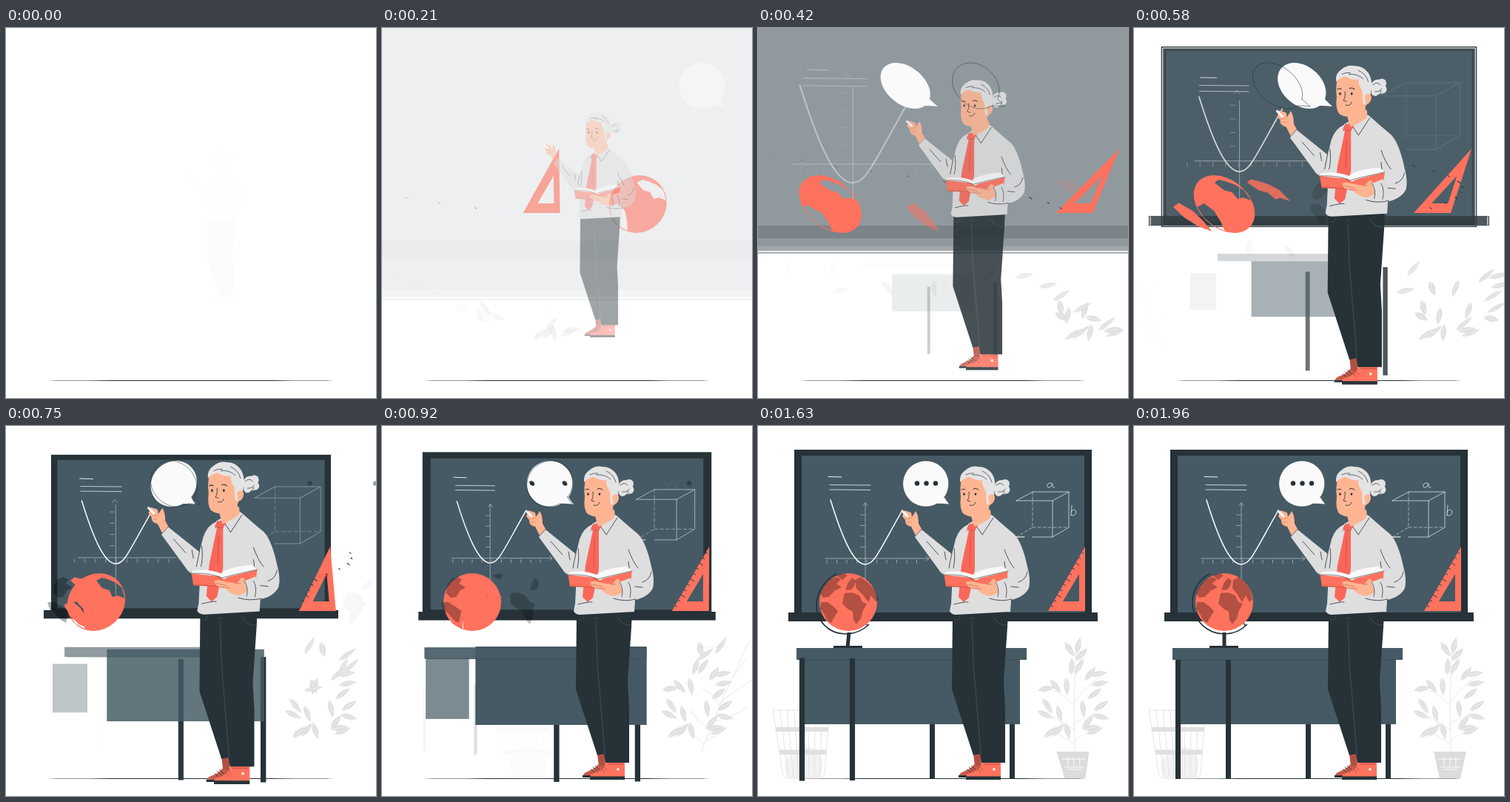
Write an HTML page with a canvas that moves like this. It is 500x500 px and loops after 2000 ms.

```html
<!DOCTYPE html>
<html lang="en">
<head>
<meta charset="utf-8">
<title>Teacher at the board</title>
<style>
html, body { margin: 0; width: 100%; height: 100%; overflow: hidden; background: #fff; }
canvas { display: block; width: 500px; height: 500px; }
</style>
</head>
<body>
<canvas id="stage"></canvas>
<script>
const INK = '#263238', SLATE = '#455a64', RED = '#ff725e', SKIN = '#ffb592',
      SHIRT = '#dedede', HAIR = '#e4e4e4', PALE = '#e0e0e0', CHALK = '#f2f2f2';
const LOOP = 2000, STEP = 1000 / 24;
const dpr = window.devicePixelRatio || 1;
const stage = document.getElementById('stage');
const pool = [];
let depth = 0, now = 0;

function sized(cv) {
  cv.width = cv.height = 500 * dpr;
  return cv.getContext('2d');
}
const main = sized(stage);
let c = main;

// cubic-bezier(.36, -.01, .5, 1.38)
function ease(x) {
  if (x <= 0) return 0;
  if (x >= 1) return 1;
  let lo = 0, hi = 1, t = .5;
  for (let i = 0; i < 24; i++) {
    t = (lo + hi) / 2;
    const u = 1 - t;
    if (1.08 * t * u * u + 1.5 * t * t * u + t * t * t < x) lo = t; else hi = t;
  }
  const u = 1 - t;
  return -.03 * t * u * u + 4.14 * t * t * u + t * t * t;
}

// Draws a group as one translucent layer
function fade(a, draw) {
  if (a < .003) return;
  if (a >= 1) return draw();
  const under = c;
  const l = pool[depth] || (pool[depth] = sized(document.createElement('canvas')));
  depth++;
  l.setTransform(1, 0, 0, 1, 0, 0);
  l.clearRect(0, 0, l.canvas.width, l.canvas.height);
  l.setTransform(under.getTransform());
  c = l;
  draw();
  c = under;
  depth--;
  c.save();
  c.setTransform(1, 0, 0, 1, 0, 0);
  c.globalAlpha = a;
  c.drawImage(l.canvas, 0, 0);
  c.restore();
}

function zoom(from, shift, cx, cy, draw) {
  const p = ease((now + shift) / 1000), s = from + (1 - from) * p;
  c.save();
  c.translate(cx, cy);
  c.scale(s, s);
  c.translate(-cx, -cy);
  fade(p, draw);
  c.restore();
}
const zoomIn = (...a) => zoom(.5, ...a);
const zoomOut = (...a) => zoom(1.5, ...a);

// dir 1 enters from the right, -1 from the left
function rush(dir, shift, cx, cy, draw, power = 1) {
  const x = (now + shift) / 1000;
  let dx = 0, skew = 0, a = 1;
  if (x < .6) {
    const p = ease(x / .6);
    dx = 500 * (1 - p);
    skew = -.577 + .941 * p;
    a = Math.pow(Math.max(p, 0), power);
  } else if (x < .8) skew = .364 - .451 * ease((x - .6) / .2);
  else if (x < 1) skew = -.087 * (1 - ease((x - .8) / .2));
  c.save();
  c.translate(cx + dx * dir, cy);
  c.transform(1, 0, skew * dir, 1, 0, 0);
  c.translate(-cx, -cy);
  fade(a, draw);
  c.restore();
}

function rect(col, x0, y0, x1, y1) {
  c.fillStyle = col;
  c.fillRect(x0, y0, x1 - x0, y1 - y0);
}
function fill(col, d, rule = 'nonzero') {
  c.fillStyle = col;
  c.fill(new Path2D(d), rule);
}
function line(col, w, d) {
  c.strokeStyle = col;
  c.lineWidth = w;
  c.lineCap = c.lineJoin = 'round';
  c.stroke(new Path2D(d));
}
function oval(col, x, y, rx, ry = rx, rot = 0) {
  c.fillStyle = col;
  c.beginPath();
  c.ellipse(x, y, rx, ry, rot, 0, 7);
  c.fill();
}

function board() {
  const edge = Math.max(0, Math.min(1, (750 - now) / 150));
  zoomOut(52, 250, 147, () => {
    zoomOut(28, 250, 147, () => {
      rect(INK, 49, 32, 451, 262);
      if (edge) {
        c.strokeStyle = `rgba(255,255,255,${edge})`;
        c.lineWidth = 1;
        c.strokeRect(51, 34, 398, 226);
      }
    });
    zoomOut(0, 250, 146, () => rect(SLATE, 59, 40, 441, 252));
    zoomOut(-25, 250, 258, () => {
      rect(INK, 41, 252, 459, 264);
      if (edge) line(`rgba(255,255,255,${edge})`, 1, 'M43 253V263M457 253V263');
    });
    axes();
    zoomOut(-90, 146, 143, () =>
      line('#fff', 1.5, 'M98 100C112 145 128 187 145 187C157 187 162 172 195 114'));
    zoomOut(-130, 104, 68, () => line(CHALK, 1, 'M95 68.5L113 69'));
    zoomOut(-135, 124, 82, () => line(CHALK, .8, 'M97 79.5L152 80M97 86L152 86.5'));
    zoomOut(-415, 384, 119, cube);
    zoomOut(-780, 395, 80, () =>
      line(CHALK, .8, 'M398 78C393 75 390 79 391 82C393 85 397 82 398 78Q397 84 401 83'));
    zoomOut(-790, 427, 115, () =>
      line(CHALK, .8, 'M424 107L423 121M423 116C427 110 432 115 429 119Q426 123 423 120'));
  });
}

function axes() {
  const tone = 'rgba(255,255,255,.65)';
  let d = 'M142 108L145 104L148 108M227 176L231 179L227 182';
  for (let x = 93; x < 222; x += 13.5) d += `M${x} 181V185`;
  for (let y = 120; y < 172; y += 14.5) d += `M139 ${y}H144`;
  zoomOut(-20, 145, 168, () => line(tone, .7, 'M145 104V232'));
  zoomOut(-20, 161, 179, () => line(tone, .7, 'M91 179H231'));
  zoomOut(-200, 161, 179, () => line(tone, .7, d));
}

function cube() {
  line('rgba(255,255,255,.8)', .8,
    'M349 101H398V150H371M360 150H349ZM349 101L371 89H420L398 101M420 89V137L398 150');
  c.setLineDash([4, 3]);
  line('rgba(255,255,255,.7)', .7, 'M371 89V137L349 150M371 137H420');
  c.setLineDash([]);
}

function ruler() {
  rush(-1, 48, 417, 207, () => fill(RED, 'M442 163V250H392ZM434 200L412 237H434Z', 'evenodd'));
  for (let i = 1; i < 12; i++) {
    const x = 392 + i * 4.15, y = 250 - i * 7.2, n = i % 3 ? 2.5 : 4.5;
    rush(-1, 40 - i * 30, x, y, () => line(INK, .9, `M${x} ${y}l${n} ${n * .6}`));
  }
}

function bin() {
  rush(1, -620, 59, 430, () => {
    fill('#f2f2f2', 'M36 462Q34 450 44 446Q52 443 60 434Q70 430 78 441Q88 445 87 464Q85 475 80 476H43Q37 474 36 462Z');
    let d = 'M20 384H97M20 384L33 468Q34 476 41 476H83Q89 475 90 469L97 384';
    for (let i = 1; i < 8; i++) d += `M${20 + i * 9.6} 384L${34 + i * 7} 474`;
    line('#dedede', .8, d);
    fill(PALE, 'M24 407H95L94.5 413H25ZM29 437.500H93L92 444H30Z');
  }, 6);
}

// x, y, angle in degrees
const LEAVES = [
  406, 411, -48, 396, 414, -40, 418, 412, 75, 450, 408, -10, 455, 412, -22, 446, 400, -50,
  388, 390, 25, 391, 378, 55, 407, 389, 75, 439, 382, 82, 463, 393, 12, 464, 378, -35,
  455, 362, -38, 462, 348, -12, 460, 335, -12, 449, 335, -52, 417, 352, 85, 402, 352, 50,
  390, 355, -12, 434, 325, -60, 424, 325, -88, 437, 309, -45, 421, 302, 55, 433, 297, -78
];
function plant() {
  rush(-1, -450, 428, 380, () => {
    line(PALE, .7, 'M428 440L427 370L430 292M428 430Q412 420 402 414M428 425Q440 418 448 409' +
      'M428 410Q405 400 390 384M428 400Q450 395 464 380M427 378Q412 362 394 355M427 372Q445 352 462 339M428 340Q432 328 437 312');
  });
  for (let i = 0; i < LEAVES.length; i += 3) {
    const [x, y, deg] = LEAVES.slice(i, i + 3);
    rush(-1, 60 - i * i * .09, x, y, () => {
      c.save();
      c.translate(x, y);
      c.rotate(deg * Math.PI / 180);
      fill(PALE, 'M-12 0Q-3 -8 12 0Q-1 7 -12 0Z');
      line('#fff', .4, 'M-11 0H7');
      c.restore();
    }, 2);
  }
  rush(-1, -890, 427, 458, () => {
    fill('#dcdcdc', 'M405 440H449L441 476H413Z');
    line('#fff', .9, 'M412 450H443M414 461H440M418 464H437M419 448V460M427 448V460M435 448V460');
  });
}

function desk() {
  const leg = (shift, x) => zoomIn(shift, x + 3.5, 396.5, () => rect(INK, x, 316, x + 7, 477));
  zoomIn(42, 207, 388, () => {
    leg(-10, 340);
    leg(-100, 232);
    zoomIn(-200, 242, 352, () => rect(SLATE, 129, 300, 354, 403));
    zoomIn(-440, 90, 355, () => rect(SLATE, 56, 308, 124, 403));
    zoomIn(-320, 207, 307, () => {
      rect(SLATE, 52, 300, 363, 316);
      rect('#3a4d56', 56, 315.5, 354, 316.5);
    });
    leg(-710, 124);
    leg(-815, 56);
  });
}

// outline, centre, arrival
const AFRICA = 'M117 226L127 225L137 229L141 238L147 240L142 249L139 260L133 268L129 262L128 251L121 247L114 240Z';
const LANDS = [
  ['M84 226L90 214L98 207L106 204L112 207L106 213L113 218L103 223L96 231L88 232Z', 98, 218, -300],
  ['M106 202L116 199L121 202L114 208Z', 113, 203, -555],
  ['M85 238L94 238L102 244L108 250L104 257L99 266L94 263L88 252L84 247Z', 96, 252, -300],
  [AFRICA, 131, 246, -570],
  ['M118 222L121 213L127 205L132 209L130 216L126 221Z', 125, 214, -585],
  ['M133 219L134 208L142 204L150 211L157 221L160 234L156 238L151 229L146 238L140 228Z', 147, 221, -964]
];
const SEAS = [
  ['M84 242L95 237L105 247L109 262L110 274L97 267L88 256Z', 96, 255, -125],
  ['M119 209L126 205L134 207L146 212L155 219L160 233L150 229L143 231L138 222L128 219Z', 140, 218, -225]
];
const OCEAN = 'M83 238A39 39 0 0 1 161 238A39 39 0 0 1 83 238Z' + SEAS.map(s => s[0]).join('');

function globe() {
  rush(1, -885, 122, 241, () => {
    c.strokeStyle = INK;
    c.lineWidth = 1.6;
    c.beginPath();
    c.arc(122, 238, 43, .77, 4.24);
    c.stroke();
    line(INK, 1.6, 'M147 265L150 269');
  });
  rush(1, -885, 122, 289, () => rect(INK, 119.5, 279, 124.5, 298));
  rush(1, -730, 121, 298, () => rect(INK, 102, 297, 141, 300), 4);
  rush(1, 36, 122, 238, () => {
    fill(RED, OCEAN, 'evenodd');
    rush(1, 27, 131, 246, () => fill(RED, AFRICA));
    for (const [d, x, y, shift] of SEAS)
      rush(1, shift, x, y, () => { fill(RED, d); line(RED, 1, d); }, 2);
  });
  for (const [d, x, y, shift] of LANDS)
    rush(1, shift, x, y, () => fill('rgba(0,0,0,.3)', d), 2);
}

function shoes() {
  fill('#b34f42', 'M291 443L301 442L302 460L293 460Z');
  fill('#c95a4a', 'M292 457Q298 462 304 457L304 472H272Q272 469 280 466Q288 463 292 457Z');
  line(INK, .8, 'M285 461L291 466M288 459L294 464M282 464L287 468');
  fill(INK, 'M271 472H304V475H271Z');
  fill(RED, 'M303 454H328V474H281Q281 470 290 468Q300 465 303 454Z');
  line('#a94538', .7, 'M296 463L301 468M299 460L304 465M326 457H306');
  oval('#ffe0da', 319, 464, 2);
  fill(INK, 'M281 473.500H328V478H281Z');
}

function head() {
  fill(SKIN, 'M287 118L311 104L314 124Q303 132 292 136Z');
  oval(HAIR, 329, 83, 10);
  oval(HAIR, 334, 78, 6);
  oval(HAIR, 335, 86, 5.5);
  oval(HAIR, 325, 90, 5);
  line(INK, .7, 'M322 80Q328 75 332 80M325 89Q331 90 334 85M330 93Q333 91 333 88');
  fill(SKIN, 'M276 68Q272 82 274 96Q272 111 277 118Q283 123 291 122Q305 121 313 108L316 84Q307 66 276 68Z');
  fill(HAIR, 'M273 76Q272 65 280 60Q288 53 298 55Q309 55 316 64Q322 73 320 87L317 104Q312 107 309 105L308 88Q303 82 303 73Q294 74 286 69Q280 69 273 76Z');
  fill(SKIN, 'M311 95Q317 89 320 95Q321 103 313 107Z');
  line(INK, .7, 'M290 66Q302 65 309 72M303 61Q313 65 316 76M281 66Q286 63 292 64');
  oval(INK, 278.5, 92, 1.3, 1.8);
  oval(INK, 294, 92, 1.3, 1.8);
  line(INK, 1, 'M275 86Q278 84 280 86M291 85Q294 83 298 86');
  line(INK, .8, 'M285 89Q286 96 283 101L287 102M286 107Q292 109 294 103');
}

function torso() {
  fill(SHIRT, 'M284 133Q272 138 267 153L262 173L221 140L212 150L247 198Q254 204 263 200L261 240L259 250Q261 255 268 255L341 251L342 235Q360 231 366 219Q369 208 364 190Q357 157 346 146Q335 137 317 121L300 126Z');
  fill(SKIN, 'M295 127L314 113L315 122L297 136L291 134Z');
  fill(SHIRT, 'M284 132L296 126L292 136L283 142ZM292 134L316 120L318 123L303 147L295 136Z');
  line(INK, .8, 'M295 135L303 147L318 124M283 141L286 132');
  fill('#f9675a', 'M285 133L292 131L297 135L293 141L293 194L285 232L278 238L271 231L275 188L285 141L282 139Z');
  line('#b7483a', .7, 'M285 141L293 141M287 152L286 190');
  line(INK, .8, 'M262 172L258 192M265 165Q267 180 264 192M228 156L244 174M254 181L252 170M333 167Q339 184 346 192M333 183L336 206M364 197Q362 208 352 211M265 241Q280 237 284 238M313 233Q328 238 343 234M342 217L352 218');
}

function hands() {
  fill(SKIN, 'M195 122L198 114L207 117L208 123L213 115Q217 120 217 132L221 139L213 148L207 136Q198 134 199 127Z');
  line('#d98067', .7, 'M199 126L207 124M201 130L207 129');
  line('#fff', 3, 'M195 115L202 122');
  fill(RED, 'M251 198L290 203L296 206L338 194L336 212L299 219L254 217Z');
  line('#b94b3d', .8, 'M254 216L289 218M291 208L290 217');
  fill('#fafafa', 'M252 198Q272 194 290 201Q302 192 331 190L339 196L299 206Q293 211 289 205L251 201Z');
  line(INK, .6, 'M252 201Q278 200 291 207Q310 202 338 196');
  fill(SKIN, 'M281 211Q288 208 296 212L311 214L317 207Q323 205 322 216L326 225L314 230Q302 228 297 222L284 217Z');
  line('#c86b56', .7, 'M284 214L298 217M289 219L302 220M309 214L316 214');
  fill(SHIRT, 'M321 211L336 205L341 232L324 231Q326 220 321 211Z');
  line(INK, .7, 'M321 211Q327 220 324 231M333 211Q338 219 335 232');
}

function person() {
  zoomIn(145, 281, 266, () => {
    shoes();
    fill(INK, 'M263 252L338 250L337 272L332 345L334 380L334 455H302L300 443L291 445L262 356Z');
    line('#52626a', .6, 'M289 264L291 320L301 443M318 258Q324 270 336 269M266 262Q272 264 273 257M287 260H291');
    torso();
    head();
    hands();
  });
}

const BUBBLE = 'M252 96A31 31 0 1 0 242 105Q250 105 259 106Q254 100 252 96Z';
function bubble() {
  rush(1, 46, 228, 78, () => fill('#fafafa', BUBBLE));
  rush(1, -75, 228, 78, () => line(INK, .5, BUBBLE));
  [[215, -490], [227.5, -532], [240, -645]].forEach(([x, shift]) =>
    rush(1, shift, x, 78, () => oval(INK, x, 77.5, 3.2)));
}

function draw(t) {
  const n = Math.floor((t % LOOP + 5) / STEP);
  now = n < 2 ? -95 : n * STEP;
  c = main;
  c.setTransform(dpr, 0, 0, dpr, 0, 0);
  rect('#fff', 0, 0, 500, 500);
  oval(INK, 250, 476.5, 197, .5);
  board();
  ruler();
  bin();
  plant();
  desk();
  globe();
  person();
  bubble();
}

const start = performance.now();
function tick() {
  draw(performance.now() - start);
  requestAnimationFrame(tick);
}
tick();
</script>
</body>
</html>
```
